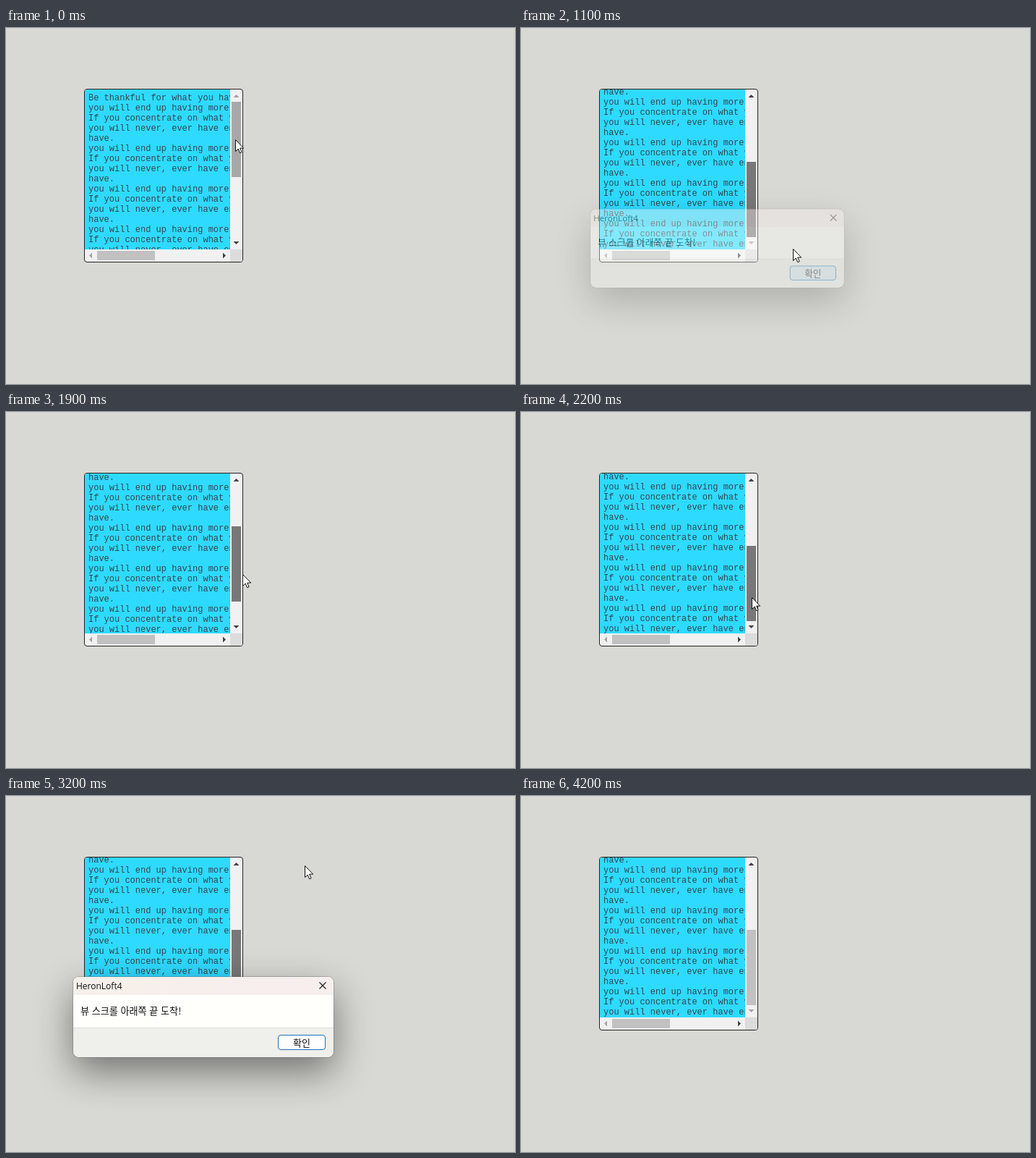
Write an HTML page that moves like this. It is 704 by 492 pixels and loops after 4400 ms.

```html
<!DOCTYPE html>
<html lang="ko">
<head>
<meta charset="utf-8">
<title>Scroll end alert</title>
<style>
  html, body { margin: 0; width: 100%; height: 100%; overflow: hidden; background: #d8d9d4; }
  #stage { position: relative; width: 704px; height: 492px; overflow: hidden; background: #d8d9d4; }
  #stage div, #stage svg { position: absolute; box-sizing: border-box; }

  #view { left: 108px; top: 84px; width: 220px; height: 240px; border: 1px solid #222; border-radius: 4px; overflow: hidden; background: #f1f1f1; }
  #pane { left: 0; top: 0; width: 201px; height: 221px; overflow: hidden; background: #2edaff; }
  #text { left: 5px; top: 5px; font: 12px/14px "Liberation Mono", monospace; color: #33474d; white-space: pre; }
  #thumb { left: 203px; top: 17px; width: 13px; height: 104px; }
  #hthumb { left: 17px; top: 223px; width: 80px; height: 13px; background: #c1c1c1; }
  #corner { left: 201px; top: 221px; width: 17px; height: 17px; background: #dcdcdc; }
  #arrows { left: 0; top: 0; }

  #dialog { left: 93px; top: 250px; width: 360px; height: 111px; transform-origin: 122px 22px; border-radius: 8px;
    box-shadow: 0 0 0 1px rgba(90,90,90,.35), 0 20px 52px rgba(0,0,0,.47);
    font: 13px/20px "Noto Sans CJK KR", "Noto Sans CJK SC", "Noto Sans CJK", sans-serif; color: #111; white-space: nowrap; }
  #face { inset: 0; border-radius: 8px; overflow: hidden; background: #efefeb; }
  #bar { left: 0; top: 0; width: 100%; height: 25px; background: linear-gradient(90deg, #f6f0ea, #f7eeee); }
  #body { left: 0; top: 25px; width: 100%; height: 46px; background: #fffffb; border-bottom: 1px solid #dcdcd9; }
  #name { left: 4px; top: 3px; font: 12px/20px "Open Sans", "Noto Sans", sans-serif; }
  #message { left: 10px; top: 37px; font-size: 13.1px; }
  #ok { left: 283px; top: 80px; width: 66px; height: 21px; line-height: 19px; text-align: center; border: 1px solid #1b72bd; border-radius: 4px; background: #fdfdfd; }
  #ok.opening { border-color: #3f9fce; box-shadow: inset 0 0 0 1px #9fd3ea; }
  #ok.hover { background: #d4e6f1; border-color: #1478bd; }
  #close { left: 340px; top: 7px; }
  #cursor { left: 0; top: 0; overflow: visible; }
</style>
</head>
<body>
<div id="stage">
  <div id="view">
    <div id="pane"><div id="text"></div></div>
    <div id="thumb"></div>
    <div id="hthumb"></div>
    <div id="corner"></div>
    <svg id="arrows" width="218" height="238">
      <path id="up" d="M205.5 11h8l-4-4z"/>
      <path id="down" d="M205.5 210h8l-4 4z"/>
      <path d="M10 225.5v8l-4-4z" fill="#a3a3a3"/>
      <path d="M191 225.5v8l4-4z" fill="#404040"/>
    </svg>
  </div>
  <div id="dialog">
    <div id="face">
      <div id="bar"></div>
      <div id="body"></div>
      <div id="name">HeronLoft4</div>
      <svg id="close" width="10" height="10"><path d="M.5 .5l9 9m0-9l-9 9" stroke="#222" stroke-width="1.2"/></svg>
      <div id="message">뷰 스크롤 아래쪽 끝 도착!</div>
      <div id="ok">확인</div>
    </div>
  </div>
  <svg id="cursor" width="13" height="20"><path d="M.5 .5v16l3.7-3.5 2.5 5.7 2.4-1-2.4-5.6h5z" fill="#fff" stroke="#111"/></svg>
</div>
<script>
const LOOP = 4400, STEP = 100;
const TRAVEL = 83, MAX_SCROLL = 176;
const $ = id => document.getElementById(id);
const ramp = (t, from, to) => Math.min(1, Math.max(0, (t - from) / (to - from)));

const verse = ["you will end up having more.", "If you concentrate on what you don't have,",
  "you will never, ever have enough.", "have."];
$("text").textContent = ["Be thankful for what you have;",
  ...Array.from({ length: 27 }, (_, i) => verse[i % 4])].join("\n");

// Where the mouse turns
const path = [
  { t: 0, x: 317, y: 154 },
  { t: 500, x: 307, y: 280 },
  { t: 900, x: 404, y: 335 },
  { t: 1500, x: 321, y: 245 },
  { t: 2200, x: 319, y: 256 },
  { t: 2700, x: 445, y: 349 },
  { t: 3100, x: 415, y: 17 },
  { t: 3500, x: 408, y: 332 },
  { t: 3900, x: 420, y: 168 }
];
const alerts = [{ open: 400, close: 900 }, { open: 2200, close: 3500 }];

// Second drag: the thumb is pulled up and let back down
const pullUp = t => 28 * Math.sin(Math.PI * ramp(t, 1500, 2202));

function pointer(t) {
  const i = Math.max(1, path.findIndex(p => p.t > t));
  const b = t < path.at(-1).t ? path[i] : path.at(-1);
  const a = path[path.indexOf(b) - 1];
  const k = ramp(t, a.t, b.t), lift = pullUp(t);
  return { x: Math.round(a.x + (b.x - a.x) * k + lift / 4), y: Math.round(a.y + (b.y - a.y) * k - lift) };
}

function drawView(t, y) {
  const drag = t < 500 ? Math.min(TRAVEL, y - path[0].y) : TRAVEL;
  const top = drag - pullUp(t);
  const arrow = active => active ? "#404040" : "#a3a3a3";
  $("thumb").style.transform = `translateY(${Math.round(top)}px)`;
  $("thumb").style.background = t < 100 ? "#a8a8a8" : t < 3800 ? "#787878" : "#c1c1c1";
  $("text").style.transform = `translateY(${-Math.round(top / TRAVEL * MAX_SCROLL)}px)`;
  $("up").style.fill = arrow(top > 0);
  $("down").style.fill = arrow(TRAVEL - top > .01);
}

function drawDialog(t) {
  const { open, close } = alerts.findLast(a => t >= a.open) || alerts[0];
  const rise = ramp(t, open, open + 250), fall = ramp(t, close, close + 300);
  $("dialog").style.opacity = Math.min(1, rise * 2.5) * (1 - fall ** 1.3);
  $("dialog").style.transform = `scale(${1 - .124 * (1 - rise) ** 2 - .04 * fall})`;
  $("ok").className = t >= close ? "hover" : rise < 1 ? "opening" : "";
}

function draw(now) {
  const t = Math.floor(now % LOOP / STEP) * STEP;
  const { x, y } = pointer(t);
  drawView(t, y);
  drawDialog(t);
  $("cursor").style.transform = `translate(${x}px, ${y}px)`;
  $("cursor").style.visibility = t < 4000 ? "visible" : "hidden";
}

const start = performance.now();
function tick() {
  draw(performance.now() - start);
  requestAnimationFrame(tick);
}
tick();
</script>
</body>
</html>
```
